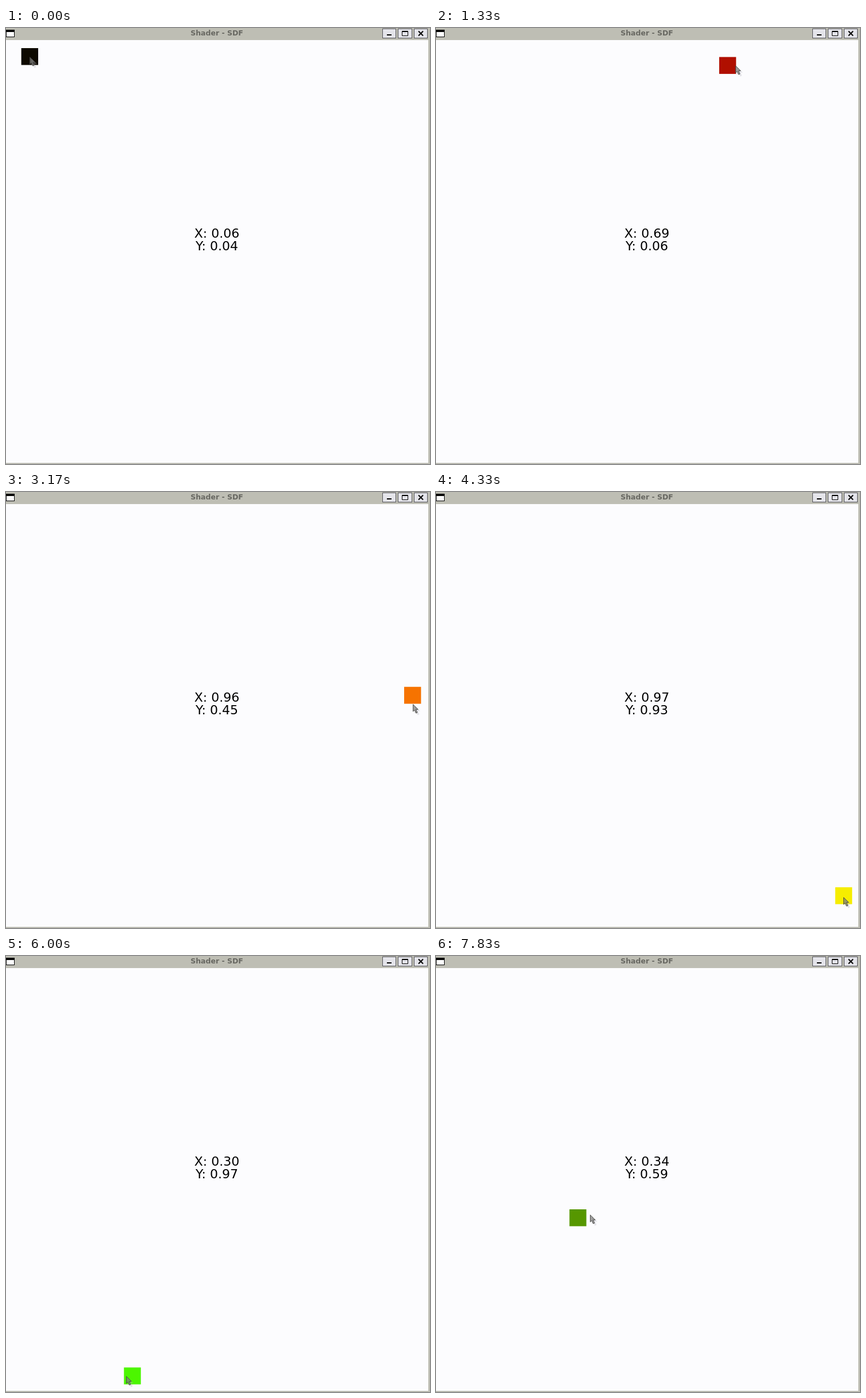
An HTML page for the animation above (7910 ms loop, 738 px wide and 759 px high).

```html
<!DOCTYPE html>
<html lang="en">
<head>
<meta charset="utf-8">
<title>Shader - SDF</title>
<style>
  html, body { margin: 0; width: 100%; height: 100%; overflow: hidden; background: #bebeb4; }
  svg { display: block; }
  text { text-anchor: middle; font-family: "DejaVu Sans", sans-serif; }
  .title { font-size: 12.5px; font-weight: bold; fill: #686862; }
  .value { font-size: 22px; fill: #000; }
  .button { fill: #e4e4ea; stroke: #55555a; }
</style>
</head>
<body>
<svg width="738" height="759" viewBox="0 0 738 759">
  <rect width="738" height="759" fill="#bebeb4"/>
  <rect y="21" width="735" height="736" fill="#fcfcfe"/>

  <rect x="0.5" y="3.5" width="14" height="12" fill="#fff" stroke="#000"/>
  <rect x="0" y="3" width="15" height="4" fill="#000"/>
  <text class="title" x="367" y="13">Shader - SDF</text>

  <g class="button">
    <rect x="655.5" y="1.5" width="23" height="16"/>
    <rect x="682.5" y="1.5" width="24" height="16"/>
    <rect x="710.5" y="1.5" width="23" height="16"/>
  </g>
  <g fill="none" stroke="#000">
    <path d="M663 12H671" stroke-width="2"/>
    <path d="M689.5 5.5H699.5V13.5H689.5ZM689 6.5H700"/>
    <path d="M718 5.5L726 13.5M726 5.5L718 13.5" stroke-width="2"/>
  </g>

  <rect id="box" width="29.4" height="29.4"/>
  <text class="value" id="tx" x="367" y="365"></text>
  <text class="value" id="ty" x="367" y="387"></text>
  <g id="cursor">
    <path transform="translate(3 3)" fill="#b8b8c4" fill-opacity=".35"
      d="M0 0V13.5L3 11L5.5 16.5L8.5 15L6 9.5H10Z"/>
    <path fill="#7b7b78" fill-opacity=".7" stroke="#484844" stroke-opacity=".9"
      d="M.5 .8V13L3.2 10.5L5.7 16L8 15L5.5 9.5H9.3Z"/>
  </g>
</svg>
<script>
const LOOP = 7910, STEP = 250 / 3, SIZE = 735, TOP = 21, HALF = 14.7;
const LEAD = 0.5; // steps by which the cursor runs ahead of the square

// Turning points of the pointer: step, x, y
const path = [
  [2, 41.3, 49.7], [12, 381, 62], [16, 507.6, 65.2], [22, 639, 57.7],
  [32, 706, 141], [38, 707.7, 353.9], [52, 709.6, 702.8], [62, 620.6, 726.2],
  [72, 220, 731], [83, 56.9, 726.8], [87, 39, 660], [94, 247, 455.7], [95, 290, 446]
];

const slope = (i, axis) =>
  (path[i + 1][axis] - path[i][axis]) / (path[i + 1][0] - path[i][0]);

// Monotone tangent: harmonic mean of the neighbouring slopes
function tangent(i, axis) {
  const a = slope(Math.max(i - 1, 0), axis);
  const b = slope(Math.min(i, path.length - 2), axis);
  return a * b > 0 ? 2 * a * b / (a + b) : 0;
}

function position(step) {
  const k = Math.max(step, path[0][0]);
  let i = 0;
  while (path[i + 1][0] <= k) i++;
  const p = path[i], q = path[i + 1], h = q[0] - p[0], u = (k - p[0]) / h;
  return [1, 2].map(axis =>
    p[axis] + (q[axis] - p[axis]) * u * u * (3 - 2 * u) +
    h * u * (1 - u) * (tangent(i, axis) * (1 - u) - tangent(i + 1, axis) * u));
}

const [box, tx, ty, cursor] =
  ["box", "tx", "ty", "cursor"].map(id => document.getElementById(id));

function draw(ms) {
  // Steps fall on multiples of 10 ms; the first picture is held for three
  const count = Math.floor((Math.floor(ms / 10) * 10 + 5) / STEP);
  const step = count < 3 ? 0 : count;
  const [x, y] = position(step);
  const [cx, cy] = position(step + LEAD).map(Math.round);
  const u = x / SIZE, v = (y - TOP) / SIZE;
  box.setAttribute("x", x - HALF);
  box.setAttribute("y", y - HALF);
  box.setAttribute("fill", `rgb(${Math.round(u * 255)},${Math.round(v * 255)},0)`);
  cursor.setAttribute("transform", `translate(${cx} ${cy})`);
  tx.textContent = "X: " + u.toFixed(2);
  ty.textContent = "Y: " + v.toFixed(2);
}

const start = performance.now();
function tick() {
  draw((performance.now() - start) % LOOP);
  requestAnimationFrame(tick);
}
tick();
</script>
</body>
</html>
```
